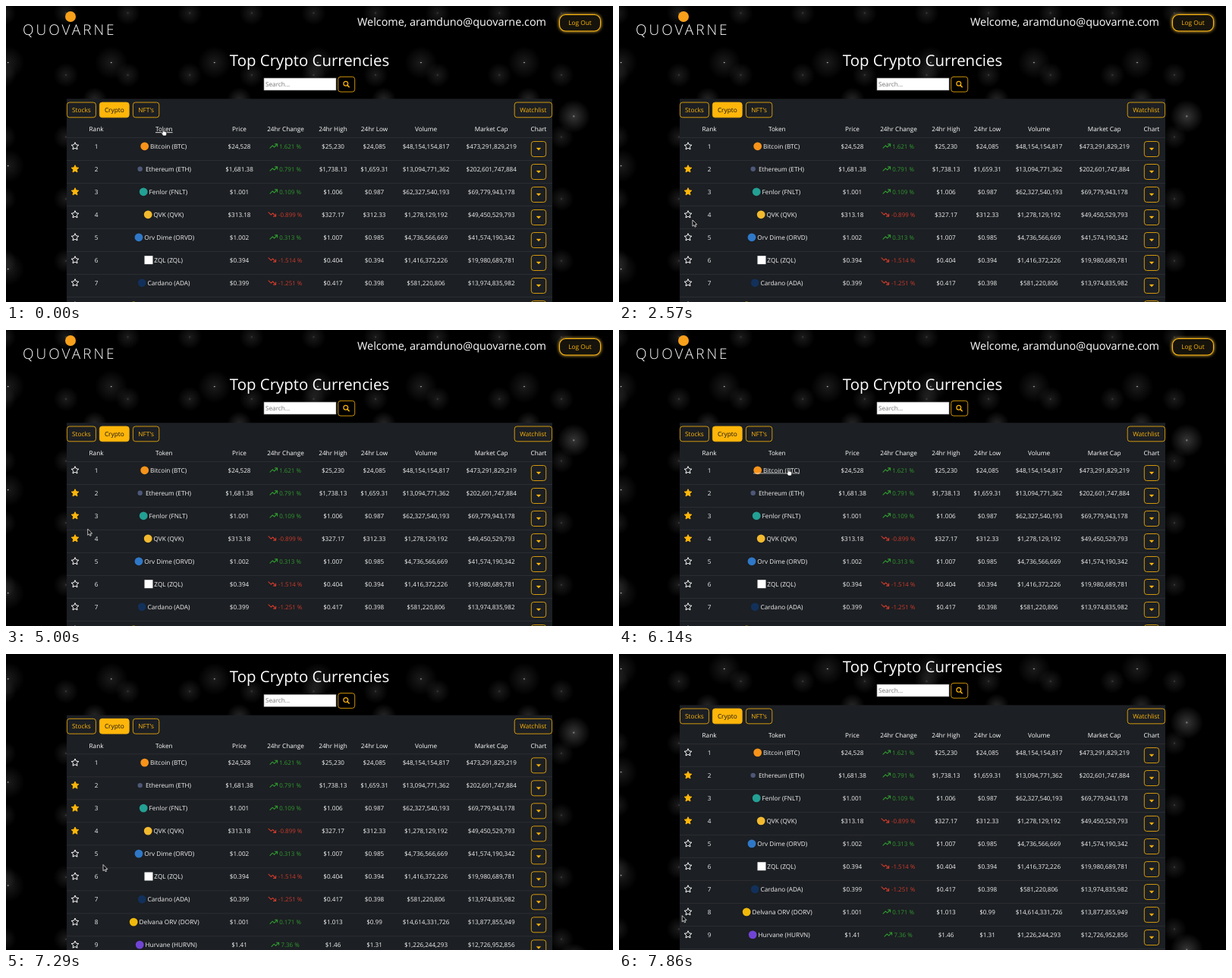
An HTML page that plays this animation: 800 px wide and 390 px high, repeating every 8 s.

```html
<!DOCTYPE html>
<html lang="en">
<head>
<meta charset="utf-8">
<title>Top Crypto Currencies</title>
<style>
  html, body { margin: 0; width: 100%; height: 100%; overflow: hidden; background: #000; }
  #stage { position: relative; width: 800px; height: 390px; overflow: hidden; background: #000; }
  #sky {
    position: absolute; left: 0; top: 0; width: 1470px; height: 1100px;
    transform-origin: 0 0;
    background-image:
      radial-gradient(white, rgba(255,255,255,.2) 2px, transparent 40px),
      radial-gradient(white, rgba(255,255,255,.15) 1px, transparent 30px),
      radial-gradient(white, rgba(255,255,255,.1) 2px, transparent 40px),
      radial-gradient(rgba(255,255,255,.4), rgba(255,255,255,.1) 2px, transparent 30px);
    background-size: 550px 550px, 350px 350px, 250px 250px, 150px 150px;
    background-position: 0 -8px, 40px 52px, 130px 262px, 70px 92px;
  }
  svg { position: absolute; left: 0; top: 0; display: block; }
  text { font-family: "Open Sans", "Noto Sans", sans-serif; text-rendering: geometricPrecision; }
</style>
</head>
<body>
<div id="stage">
  <div id="sky"></div>
  <svg id="view" width="800" height="390" viewBox="0 0 800 390"></svg>
</div>
<script>
const NS = 'http://www.w3.org/2000/svg';
const AMBER = '#ffb60a', GREEN = '#309a30', RED = '#cf3a2c';
const LOOP = 8000, STEP = LOOP / 56, ROW = 30;
const view = document.getElementById('view');
const sky = document.getElementById('sky');

function add(parent, tag, attrs, content) {
  const node = document.createElementNS(NS, tag);
  for (const name in attrs) node.setAttribute(name, attrs[name]);
  if (content !== undefined) node.textContent = content;
  parent.appendChild(node);
  return node;
}

const page = add(view, 'g', {});

function label(x, y, str, size = 8.15, attrs = {}) {
  return add(page, 'text', { x, y, 'font-size': size, fill: '#f2f2f2', 'text-anchor': 'middle', ...attrs }, str);
}

function button(x, y, w, h, str, attrs = {}, ink = AMBER) {
  add(page, 'rect', { x, y, width: w, height: h, rx: 3.3, fill: 'none', stroke: AMBER, 'stroke-width': .8, ...attrs });
  if (str) label(x + w / 2, y + h / 2 + 3, str, 8.3, { fill: ink });
}

function starPath(cx, cy, r) {
  let d = '';
  for (let i = 0; i < 10; i++) {
    const a = -Math.PI / 2 + i * Math.PI / 5, q = i % 2 ? r * .48 : r;
    d += (i ? 'L' : 'M') + (cx + q * Math.cos(a)).toFixed(2) + ' ' + (cy + q * Math.sin(a)).toFixed(2);
  }
  return d + 'Z';
}

// Header
add(page, 'circle', { cx: 85, cy: 14, r: 7, fill: '#f9a01b' });
label(22, 38, 'QUOVARNE', 19, { 'text-anchor': 'start', 'letter-spacing': 3, 'font-weight': 300, fill: '#fff' });
label(712, 25.8, 'Welcome, aramduno@quovarne.com', 14.4, { 'text-anchor': 'end', fill: '#fff' });
button(729.5, 11.5, 54, 21.5, 'Log Out',
  { rx: 8, fill: '#15130c', 'stroke-width': 1.1, style: 'filter:drop-shadow(0 0 2px #ffc94b)' });
label(400, 79, 'Top Crypto Currencies', 20.4, { fill: '#fff' });

// Search
add(page, 'rect', { x: 340, y: 95, width: 95, height: 16, fill: '#fff', stroke: '#8a8a8a', 'stroke-width': .6 });
label(342, 105.8, 'Search...', 8.2, { 'text-anchor': 'start', fill: '#757575' });
button(437.7, 93.3, 22, 19.8);
add(page, 'path', { d: 'M449.9 104.4L452.2 106.7', stroke: AMBER, 'stroke-width': 1.5, 'stroke-linecap': 'round' });
add(page, 'circle', { cx: 447.8, cy: 102.3, r: 2.9, fill: 'none', stroke: AMBER, 'stroke-width': 1.2 });

// Table
add(page, 'rect', { x: 80, y: 122.3, width: 640, height: 400, fill: '#1c1f23' });
button(80.4, 127, 38, 19.8, 'Stocks');
button(123.4, 127, 38.8, 19.8, 'Crypto', { fill: AMBER }, '#111');
button(167.4, 127, 34.4, 19.8, "NFT's");
button(670.2, 127, 49.4, 19.8, 'Watchlist');

const heads = [[119, 'Rank'], [208.3, 'Token'], [307.5, 'Price'], [368.5, '24hr Change'], [431, '24hr High'],
  [485.5, '24hr Low'], [553.5, 'Volume'], [639.7, 'Market Cap'], [702, 'Chart']];
const headTexts = heads.map(([x, str]) => label(x, 165.3, str, 8.2, { fill: '#fff', 'font-weight': 500 }));

// name, text x, icon colour, price, change, high, low, volume, market cap
const coins = [
  ['Bitcoin (BTC)', 190, '#f7931a', '24,528', '1.621', '25,230', '24,085', '48,154,154,817', '473,291,829,219'],
  ['Ethereum (ETH)', 184, '#4d5878', '1,681.38', '0.791', '1,738.13', '1,659.31', '13,094,771,362', '202,601,747,884'],
  ['Fenlor (FNLT)', 188.5, '#23a094', '1.001', '0.109', '1.006', '0.987', '62,327,540,193', '69,779,943,178'],
  ['QVK (QVK)', 194.5, '#f3ba2f', '313.18', '-0.899', '327.17', '312.33', '1,278,129,192', '49,450,529,793'],
  ['Orv Dime (ORVD)', 182.3, '#2f78c8', '1.002', '0.313', '1.007', '0.985', '4,736,566,669', '41,574,190,342'],
  ['ZQL (ZQL)', 195.3, '#fff', '0.394', '-1.514', '0.404', '0.394', '1,416,372,226', '19,980,689,781'],
  ['Cardano (ADA)', 186.5, '#12305a', '0.399', '-1.251', '0.417', '0.398', '581,220,806', '13,974,835,982'],
  ['Delvana ORV (DORV)', 175.5, '#f0b90b', '1.001', '0.171', '1.013', '0.99', '14,614,331,726', '13,877,855,949'],
  ['Hurvane (HURVN)', 183.5, '#7044d4', '1.41', '7.36', '1.46', '1.31', '1,226,244,293', '12,726,952,856']
];

function trend(x, y, up) {
  add(page, 'path', {
    d: 'M0 2.6L3.3-.6L5.6 1.5L9.2-2.2M6.5-2.6H9.6V.5', fill: 'none', stroke: up ? GREEN : RED,
    'stroke-width': 1.1, 'stroke-linejoin': 'round', 'stroke-linecap': 'round',
    transform: `translate(${x} ${y}) scale(1 ${up ? 1 : -1})`
  });
}

function rule(y) {
  add(page, 'path', { d: `M80 ${y}H720`, stroke: '#34383c', 'stroke-width': .6 });
}

const rows = coins.map(([name, x, tint, price, change, high, low, volume, cap], i) => {
  const y = 184.5 + i * ROW, base = y + 3, up = change[0] !== '-';
  rule(y - 11);
  const star = add(page, 'path', { d: starPath(91, y + .3, 5.1), 'stroke-width': 1, 'stroke-linejoin': 'round' });
  label(119, base, i + 1);
  if (tint === '#fff') add(page, 'rect', { x: x - 12.8, y: y - 5.3, width: 11, height: 11, fill: tint });
  else add(page, 'circle', { cx: x - 7.3, cy: y + .3, r: i === 1 ? 3.2 : 5.4, fill: tint });
  const text = label(x, base, name, 8.25, { 'text-anchor': 'start' });
  label(307.5, base, '$' + price);
  trend(362 - 2 * (change.length + 2), y, up);
  label(374.6, base, change + ' %', 7.9, { fill: up ? GREEN : RED });
  [[431, high], [485.5, low], [553.5, volume], [639.7, cap]].forEach(([cx, n]) => label(cx, base, '$' + n));
  button(692.3, y - 6, 19.4, 20);
  add(page, 'path', { d: `M699.2 ${y + 2.6}h5.6l-2.8 3z`, fill: AMBER, stroke: AMBER, 'stroke-width': .4, 'stroke-linejoin': 'round' });
  return { y, star, x1: x - 13, x2: x + text.getComputedTextLength() };
});
rule(184.5 + rows.length * ROW - 11);

const underline = add(page, 'path', { stroke: '#f2f2f2', 'stroke-width': .7 });

// Pointers, both with their tip at 0,0
const arrow = add(view, 'path', {
  d: 'M0 0V8.2L1.9 6.5L3.1 9.2L4.5 8.6L3.3 6H5.8Z',
  fill: '#000', stroke: '#fff', 'stroke-width': .75, 'stroke-linejoin': 'round'
});
const hand = add(view, 'path', {
  d: 'M-.8 .6Q0-.5 .8 .6V3.2Q1.7 2.7 2.2 3.4Q3.1 3 3.5 3.8Q4.6 3.5 4.7 4.6V6.5Q4.6 7.8 3.8 9H.1Q-.8 7.6-2.3 5.7Q-2.6 4.6-1.6 4.8L-.8 5.5Z',
  fill: '#fff', stroke: '#000', 'stroke-width': .65, 'stroke-linejoin': 'round'
});

const path = [[0, 207, 162], [1000, 163, 241], [2570, 97, 282], [3400, 89, 275], [4860, 89, 275],
  [5860, 223, 183], [6500, 223, 183], [7290, 127.5, 278], [7860, 83, 345]];
const scroll = [[0, 0], [6720, 0], [7290, 42], [7570, 51.5], [7860, 55]];

function at(keys, t) {
  const i = keys.findIndex(k => k[0] > t);
  if (i < 0) return keys[keys.length - 1].slice(1);
  const a = keys[i - 1], b = keys[i], p = (t - a[0]) / (b[0] - a[0]);
  return a.slice(1).map((v, j) => v + (b[j + 1] - v) * p);
}

function draw(ms) {
  const t = Math.floor((ms % LOOP + 5) / STEP) % 56 * STEP;
  const [x, y] = at(path, t), [dy] = at(scroll, t), py = y + dy;

  page.setAttribute('transform', `translate(0 ${-dy})`);
  sky.style.transform = `translateY(${-dy}px) scale(.5442)`;

  rows.forEach((row, i) => {
    const on = i === 1 || i === 2 || (i === 3 && t > 4560);
    row.star.setAttribute('fill', on ? AMBER : 'none');
    row.star.setAttribute('stroke', on ? AMBER : '#fff');
  });

  const onHead = x > 196 && x < 220 && py > 157 && py < 168;
  const link = rows.find(r => x > r.x1 && x < r.x2 && Math.abs(py - r.y) < 6);
  const onStar = rows.some(r => Math.abs(x - 91) < 5 && Math.abs(py - r.y) < 5);
  headTexts[1].setAttribute('text-decoration', onHead ? 'underline' : 'none');
  underline.setAttribute('d', link ? `M${link.x1} ${link.y + 4.4}H${link.x2}` : 'M0 0');

  const pointing = onHead || link || onStar;
  hand.setAttribute('visibility', pointing ? 'visible' : 'hidden');
  arrow.setAttribute('visibility', pointing ? 'hidden' : 'visible');
  (pointing ? hand : arrow).setAttribute('transform', `translate(${x} ${y})`);
}

const start = performance.now();
function tick() {
  draw(performance.now() - start);
  requestAnimationFrame(tick);
}
tick();
</script>
</body>
</html>
```
